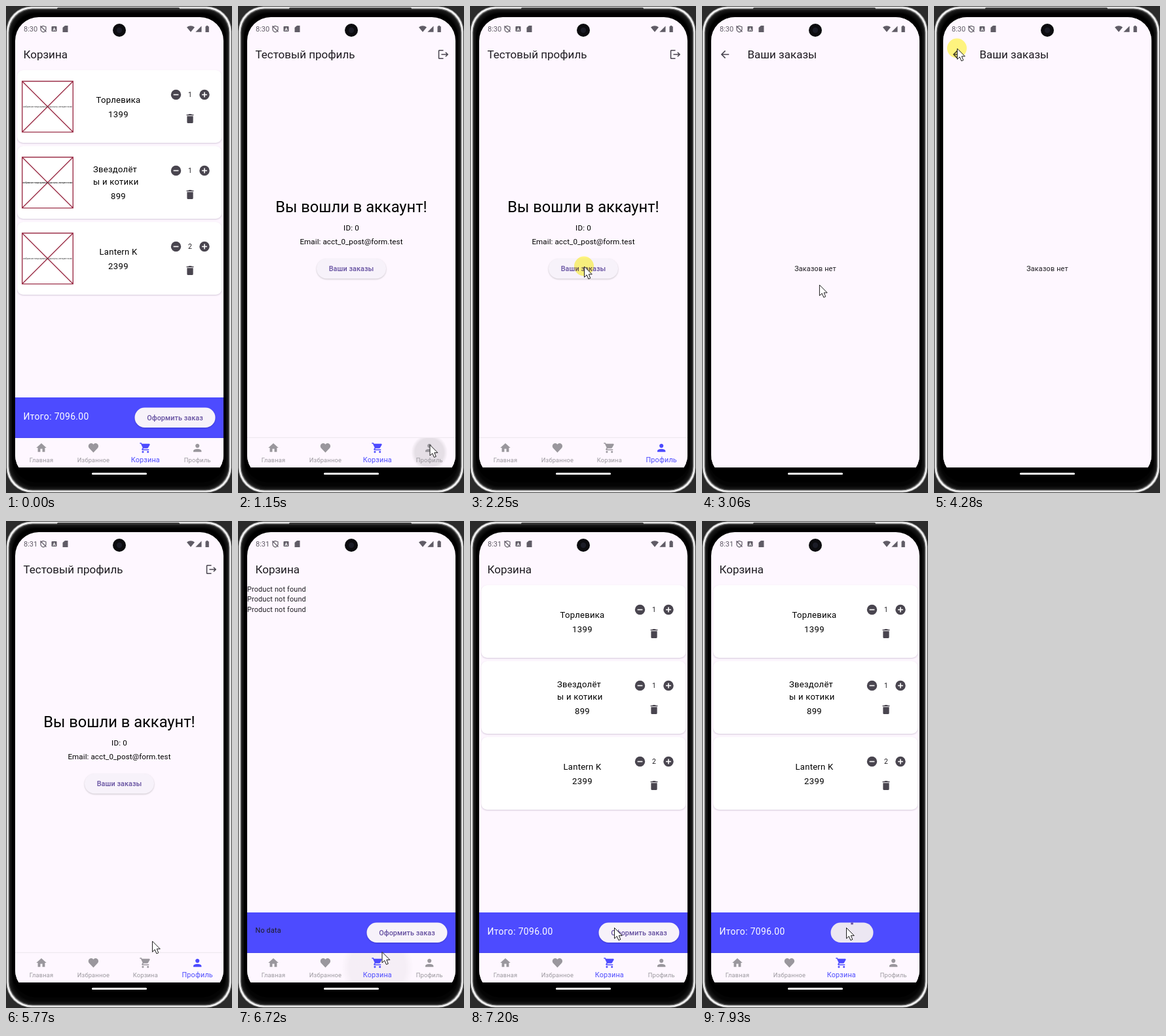
Animation, 345 px wide and 744 px high, one loop 7.99 s. Source, as an HTML page:

```html
<!DOCTYPE html>
<html lang="ru">
<head>
<meta charset="utf-8">
<title>Корзина и профиль</title>
<style>
html, body { margin: 0; width: 100%; height: 100%; overflow: hidden; background: #2b2b2b; }
svg { display: block; width: 345px; height: 744px; font-family: Roboto, "Open Sans", sans-serif; }
.card { filter: drop-shadow(0 1px .8px rgba(60, 30, 80, .22)); }
.btn { filter: drop-shadow(0 1px .8px rgba(0, 0, 0, .2)); }
#halo { mix-blend-mode: multiply; }
</style>
</head>
<body>
<svg id="stage" viewBox="0 0 345 744" xmlns="http://www.w3.org/2000/svg"></svg>
<script>
const LOOP = 7990;
const INK = '#1d1b20', GREY = '#49454f', PAGE = '#fef7ff', BLUE = '#4d4bff', PURPLE = '#6550a0';

// Moments of the story, in ms
const AT = { enter: 190, profile: 1080, push: 2317, pop: 4490, cart: 6130, loaded: 6850, press: 7460, busy: 7690 };
const CLICKS = [950, 2250, 4280, 6040];

// Pointer moves, eased from one place to the next
const MOVES = [
  { from: 190, to: 540, x: 292.5, y: 670 },
  { from: 1450, to: 2050, x: 174, y: 397.5 },
  { from: 3000, to: 3200, x: 196, y: 524 },
  { from: 3200, to: 3750, x: 8, y: 30 },
  { from: 3820, to: 4280, x: 35, y: 64.5 },
  { from: 4830, to: 5170, x: 59, y: 109 },
  { from: 5230, to: 5840, x: 229, y: 661 },
  { from: 5850, to: 5980, x: 219.5, y: 658 },
  { from: 6860, to: 7130, x: 220, y: 621 }
];

// Outlines on a 24-unit square
const ICON = {
  home: 'M10 20v-6h4v6h5v-8h3L12 3 2 12h3v8z',
  heart: 'M12 21.3L3.4 12.2A5.5 5.5 0 0 1 12 5.1 5.5 5.5 0 0 1 20.6 12.2z',
  cart: 'M7 18a2 2 0 1 0 .01 0zM17 18a2 2 0 1 0 .01 0zM1 2v2h2l3.6 7.6-1.4 2.4Q4 17 7 17h12v-2H7.4l.7-2h7.5q1.1 0 1.7-1L21 5.4 20 4H5.2L4.3 2z',
  person: 'M12 4a4 4 0 1 0 .01 0zM4 20v-2c0-5 16-5 16 0v2z',
  bin: 'M6 7h12v12q0 2-2 2H8q-2 0-2-2zM5 4h3.5l1-1h5l1 1H19v2H5z',
  exit: 'M17 7l-1.4 1.4 2.6 2.6H8v2h10.2l-2.6 2.6L17 17l5-5zM12 3H4q-2 0-2 2v14q0 2 2 2h8v-2H4V5h8z',
  back: 'M20 11H7.8l5.6-5.6L12 4l-8 8 8 8 1.4-1.4L7.8 13H20z'
};

const icon = (name, x, y, fill = GREY, id = '') =>
  `<path ${id && `id="${id}"`} d="${ICON[name]}" fill="${fill}" transform="translate(${x} ${y}) scale(.774) translate(-12 -12)"/>`;
const rect = (x, y, w, h, fill, r = 0, more = '') =>
  `<rect x="${x}" y="${y}" width="${w}" height="${h}" rx="${r}" fill="${fill}" ${more}/>`;
const text = (x, y, size, str, fill = INK, gap = 0, more = '') =>
  `<text x="${x}" y="${y}" font-size="${size}" fill="${fill}" letter-spacing="${gap}" ${more}>${str}</text>`;
const mid = (x, y, size, str, fill = INK, gap = 0, more = '') =>
  text(x, y, size, str, fill, gap, `text-anchor="middle" ${more}`);
const title = (x, str) => text(x, 80, 17, str);
const button = (x, y, w, str) =>
  rect(x, y, w, 30.5, '#f7f2fa', 15.25, 'class="btn"') +
  mid(x + w / 2, Math.floor(y + 19.5), 10.8, str, PURPLE, .08, 'font-weight="500"');
const page = id => rect(14, 17, 318, 688, id === 'scrim' ? '#000' : PAGE, 0, `id="${id}"`);

const ITEMS = [
  { name: ['Торлевика'], price: 1399, count: 1 },
  { name: ['Звездолёт', 'ы и котики'], price: 899, count: 1 },
  { name: ['Lantern K'], price: 2399, count: 2 }
];

function card({ name, price, count }, i) {
  const y = 98 + i * 116, ctl = y + 37.5, two = name.length > 1;
  const names = two
    ? name.map((s, k) => text(133, y + 40 + k * 19, 13.1, s, '#000', .25)).join('')
    : mid(171.5, y + 50, 13.1, name[0], '#000', .25);
  const dots = [259.5, 303].map(x =>
    `<circle cx="${x}" cy="${ctl}" r="7.7" fill="${GREY}"/>` + rect(x - 3.9, ctl - .8, 7.8, 1.6, '#fff')).join('');
  return rect(17, y, 312.5, 111, '#fff', 9, 'class="card"') + names + dots +
    rect(302.2, ctl - 3.9, 1.6, 7.8, '#fff') +
    mid(171.5, y + (two ? 81 : 72), 13.1, price, '#000', .35) +
    mid(281, y + 41, 10.4, count) + icon('bin', 281, y + 74);
}

function picture(_, i) {
  const y = 115 + i * 116;
  return `<path d="M24.7 ${y}h77.6v77.6H24.7zl77.6 77.6m0 -77.6l-77.6 77.6" fill="none" stroke="#9c3049" stroke-width="1.4"/>` +
    mid(63.5, y + 39.6, 2.6, 'изображение товара временно недоступно, повторите позже', '#333', 0,
      i === 1 ? 'font-weight="700"' : '');
}

const TABS = [['home', 'Главная'], ['heart', 'Избранное'], ['cart', 'Корзина'], ['person', 'Профиль']];
const tabX = i => 54 + 79.4 * i;

const cart = `<g id="cart">${title(26.5, 'Корзина')}
  <g id="goods">${ITEMS.map(card).join('')}<g id="pics">${ITEMS.map(picture).join('')}</g></g>
  <g id="lost">${[0, 1, 2].map(i => text(14, 107.5 + 15.5 * i, 10.8, 'Product not found', INK, .19)).join('')}</g>
  ${rect(14, 598, 318, 62, BLUE)}
  ${text(26.5, 632, 13.9, 'Итого: 7096.00', '#fff', .36, 'id="total"')}
  ${text(26.5, 629, 10.8, 'No data', INK, .19, 'id="nodata"')}
  <g id="order">${button(196.5, 613.5, 123, 'Оформить заказ')}
    <g clip-path="url(#orderClip)"><circle id="press" cx="220" cy="621" fill="${PURPLE}" opacity=".09"/></g></g>
  <g id="busy">${rect(196.5, 613.5, 65, 30.5, '#ece7f2', 15.25)}
    <circle id="spin" cx="229" cy="631.5" r="16.5" fill="none" stroke="${PURPLE}" stroke-width="3" stroke-dasharray="3.6 200"/></g>
</g>`;

const profile = `<g id="profile">${title(26.5, 'Тестовый профиль')}${icon('exit', 313.5, 74)}
  ${mid(173, 315, 23.7, 'Вы вошли в аккаунт!', '#000')}
  ${mid(173, 343, 11.6, 'ID: 0', '#000', .16)}
  ${mid(173, 364, 11.6, 'Email: acct_0_post@form.test', '#000', .1)}
  ${button(120, 386, 106, 'Ваши заказы')}</g>`;

const nav = `${rect(14, 658.8, 318, 1.2, 'rgba(0,0,0,.06)')}${rect(14, 660, 318, 45, PAGE)}
  <g clip-path="url(#navClip)">${[2, 3].map(i => `<circle id="ripple${i}" cx="${tabX(i)}" cy="682" fill="url(#soft)"/>`).join('')}</g>` +
  TABS.map(([name, label], i) =>
    icon(name, tabX(i), 675, GREY, 'tabIcon' + i) + mid(tabX(i), 697, 9.3, label, GREY, .19, `id="tabText${i}"`)).join('');

const orders = `<g id="orders">${page('sheet')}${icon('back', 35, 74)}
  <circle id="tap" cx="35" cy="74" r="17" opacity=".07"/>
  ${title(69.5, 'Ваши заказы')}${mid(173, 405, 10.8, 'Заказов нет', INK, .19)}</g>`;

const status = `${text(27, 39, 11, '8:30', '#605c66', 0, 'id="clock"')}
  <path d="M57 30.5l4 1.5v3.4q0 3.2-4 4.6-4-1.4-4-4.6V32zM52.5 30.5l9 9" fill="none" stroke="#605c66" stroke-width="1.2"/>
  ${rect(69.5, 31, 8, 8, '#605c66', 1)}${mid(73.5, 37.6, 7, 'A', '#fff', 0, 'font-weight="700"')}
  <path d="M90 30h4.5v10h-8v-7zM276 32.6a9 9 0 0 1 12 0l-6 7.2zM298.5 30.5v9.2h-9.2zM304.5 31.2h1.2v-1.2h2.6v1.2h1.5v8.8h-5.3z" fill="#605c66"/>
  <circle cx="173" cy="37" r="10" fill="#0c0c0f"/><circle cx="173" cy="37" r="4.2" fill="#1b1c26"/>`;

// Metal rim: nested outlines that fall off from silver to black
const rim = Array.from({ length: 11 }, (_, i) => {
  const g = Math.round(225 * Math.exp(-(((i - 1.5) / 1.7) ** 2)) + 44 * (1 - i / 11));
  return rect(.5 + i, .5 + i, 344 - 2 * i, 743 - 2 * i, `rgb(${g},${g},${g})`, 38 - i * .4);
}).join('');

const body = `<defs>
  <radialGradient id="soft"><stop offset=".78"/><stop offset="1" stop-opacity="0"/></radialGradient>
  <clipPath id="screen">${rect(14, 17, 318, 705, '#000', 36)}</clipPath>
  <clipPath id="navClip">${rect(14, 660, 318, 45, '#000')}</clipPath>
  <clipPath id="orderClip">${rect(196.5, 613.5, 123, 30.5, '#000', 15.25)}</clipPath></defs>
  ${rect(0, 0, 345, 744, '#2b2b2b')}${rim}
  ${rect(9, 11, 327, 717, '#000', 38)}${rect(78, 2.5, 187, 3, '#303030', 1.5)}`;

const stage = document.getElementById('stage');
stage.innerHTML = body + `<g clip-path="url(#screen)">
  <g id="main">${page('base')}${cart}${profile}${nav}</g>${page('scrim')}${orders}
  ${rect(14, 705, 318, 20, '#000')}${rect(131, 713, 84, 3, '#fff', 1.5)}${status}</g>
  <circle id="halo" r="15" fill="#fffb7e"/>
  <path id="pointer" d="M0 0V16.4L3.8 12.9 6.4 19 9.3 17.8 6.8 11.9H11.8Z" fill="#fff" stroke="#1c1c1c" stroke-linejoin="round"/>`;

const el = {};
stage.querySelectorAll('[id]').forEach(n => el[n.id] = n);

const ramp = (t, a, b) => Math.min(1, Math.max(0, (t - a) / (b - a)));
const easeOut = p => 1 - (1 - p) ** 3;
const smooth = p => p * p * (3 - 2 * p);
const show = (n, on) => n.setAttribute('display', on ? 'inline' : 'none');
const set = (n, attrs) => { for (const k in attrs) n.setAttribute(k, attrs[k]); };
const zoom = s => `translate(173 361.5) scale(${s}) translate(-173 -361.5)`;

function drawTabs(t) {
  const p = ramp(t, AT.profile + 90, AT.profile + 320) - ramp(t, AT.cart + 90, AT.cart + 320);
  [0, 0, 1 - p, p].forEach((v, i) => {
    const mix = (a, b) => Math.round(a + (b - a) * v);
    const fill = `rgb(${mix(154, 77)},${mix(151, 75)},${mix(157, 255)})`;
    set(el['tabIcon' + i], { fill });
    set(el['tabText' + i], { fill, 'font-size': 9.3 + 1.5 * v });
  });
}

function drawRipple(n, t, begin, length) {
  const p = ramp(t, begin, begin + length);
  set(n, { r: 60 * p ** .4, opacity: .1 * (1 - p * p) });
}

function drawPages(t) {
  const onProfile = t >= AT.profile && t < AT.cart;
  const loaded = t < AT.profile || t >= AT.loaded;
  show(el.cart, !onProfile);
  show(el.profile, onProfile);
  show(el.pics, t < AT.profile);
  [el.goods, el.total].forEach(n => show(n, loaded));
  [el.lost, el.nodata].forEach(n => show(n, !loaded));
  el.clock.textContent = t < AT.pop ? '8:30' : '8:31';
}

function drawOrders(t) {
  const push = ramp(t, AT.push, AT.push + 300), pop = ramp(t, AT.pop, AT.pop + 300);
  const behind = pop > 0 ? .1 * (1 - easeOut(pop)) : .05 * easeOut(push) * (push < 1);
  set(el.main, { transform: zoom(1 + behind) });
  set(el.scrim, { opacity: pop > 0 ? 0 : .6 * ramp(push, .2, .42) });
  show(el.orders, push > 0 && pop < 1);
  set(el.orders, {
    opacity: ramp(push, .12, .25) * (1 - ramp(pop, .08, .4)),
    transform: zoom(.85 + .15 * easeOut(push) - .1 * easeOut(pop))
  });
  show(el.tap, t >= AT.pop - 80);
}

function drawButton(t) {
  show(el.order, t < AT.busy);
  show(el.busy, t >= AT.busy);
  set(el.press, { r: 100 * ramp(t, AT.press, AT.press + 180) });
  set(el.spin, { transform: `rotate(${64 + 200 * ramp(t, AT.busy, 7930)} 229 631.5)` });
}

function drawPointer(t) {
  let x = 316, y = 738;
  for (const m of MOVES) {
    const p = smooth(ramp(t, m.from, m.to));
    x += (m.x - x) * p;
    y += (m.y - y) * p;
  }
  show(el.pointer, t >= AT.enter);
  set(el.pointer, { transform: `translate(${x + .5} ${y + .5})` });
  show(el.halo, CLICKS.some(c => t >= c && t < c + 135));
  set(el.halo, { cx: x, cy: y });
}

function render(t) {
  drawPages(t);
  drawOrders(t);
  drawTabs(t);
  drawRipple(el.ripple3, t, AT.profile, 480);
  drawRipple(el.ripple2, t, AT.cart, 740);
  drawButton(t);
  drawPointer(t);
}

const start = performance.now();
function tick() {
  render((performance.now() - start) % LOOP);
  requestAnimationFrame(tick);
}
tick();
</script>
</body>
</html>
```
